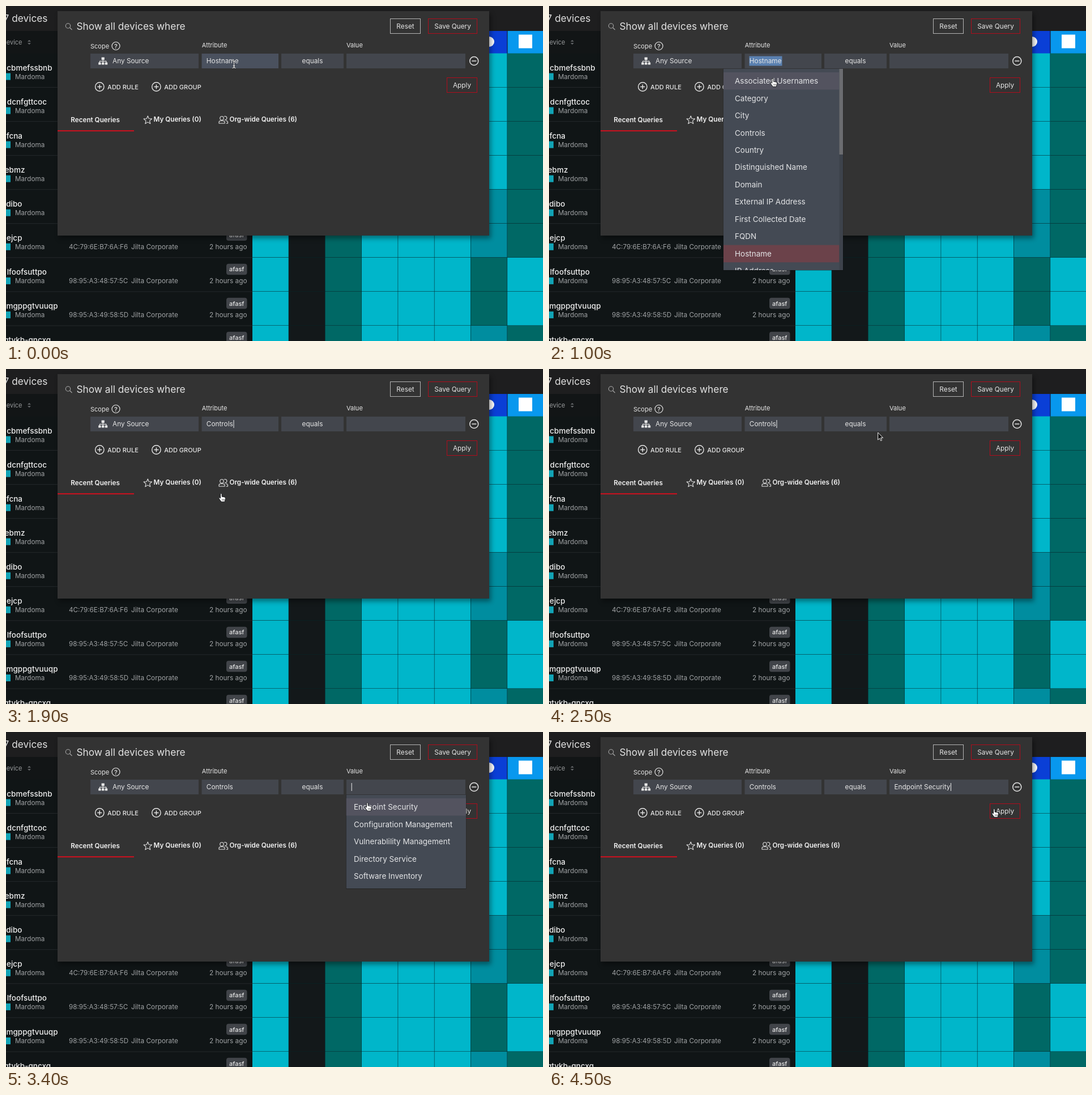
Write an HTML page that moves like this. It is 948x591 px and loops after 6500 ms.

```html
<!DOCTYPE html>
<html lang="en">
<head>
<meta charset="utf-8">
<title>Device query builder</title>
<style>
html, body { margin: 0; width: 100%; height: 100%; overflow: hidden; background: #101516; }
body > svg { display: block; width: 100vw; height: 100vh; }
text { font-family: Inter, Roboto, sans-serif; white-space: pre; }
#panel { filter: drop-shadow(3px 5px 4px rgba(0, 0, 0, .4)); }
</style>
</head>
<body>
<svg viewBox="0 0 948 591">
  <g id="table"></g>
  <g id="panel"><rect x="91" y="9" width="762" height="396" fill="#333"/></g>
  <g id="form"></g>
  <g id="live"></g>
</svg>
<script>
const $ = id => document.getElementById(id);
const rect = (x, y, w, h, fill, more = '') =>
  `<rect x="${x}" y="${y}" width="${w}" height="${h}" fill="${fill}" ${more}/>`;
const text = (x, y, str, size, fill = '#e6e6e6', more = '') =>
  `<text x="${x}" y="${y}" font-size="${size}" fill="${fill}" ${more}>${str}</text>`;
const icon = (x, y, d, width = 1.2, color = '#e6e6e6', fill = 'none') =>
  `<path transform="translate(${x} ${y})" d="${d}" fill="${fill}" stroke="${color}" stroke-width="${width}" stroke-linejoin="round"/>`;
const ring = r => `M${-r} 0a${r} ${r} 0 1 1 ${2 * r} 0a${r} ${r} 0 1 1 ${-2 * r} 0`;
const END = 'text-anchor="end"', MID = 'text-anchor="middle"';
const MEDIUM = ' font-weight="500"', BOLD = ' font-weight="600"';

// Device table behind the panel
const ROW = 60.06, COL = 64.3;
const hosts = [['cbmefssbnb', 81.5], ['dcnfgttcoc', 72], ['fcna', 29], ['ebmz', 33.5], ['dibo', 28.5],
  ['ejcp', 28.5], ['lfoofsuttpo', 72], ['mgppgtvuuqp', 91.5], ['qtvkb-qncxg', 79]];
const macs = { 5: '4C:79:6E:B7:6A:F6', 6: '98:95:A3:48:57:5C', 7: '98:95:A3:49:58:5D' };
const shades = { c: '#00b6ca', t: '#006865', m: '#008d9f', d: '#13181a' };
const ends = ['ct', 'ct', 'ct', 'ct', 'mt', 'mt', 'tc', 'tc', 'mt'];

function drawTable() {
  let s = rect(0, 0, 948, 44, '#1e1e1f') + rect(0, 44, 948, 40, '#121516')
    + text(73.5, 28, '7 devices', 17.3, '#e0e0e0', END)
    + text(28.5, 68, 'Device', 11, '#97999b', END)
    + icon(41, 64, 'M-3-1.2 0-4 3-1.2ZM-3 1.2 0 4 3 1.2Z', 0, 'none', '#6b6e70')
    + rect(820.5, 44, 64, 40, '#0a3fd6') + rect(885.5, 44, 63, 40, '#0898ee')
    + '<circle cx="853" cy="63" r="9" fill="#fff"/>' + rect(905, 50.5, 24, 24, '#fff');
  hosts.forEach(([host, right], i) => {
    const top = 83.5 + i * ROW;
    [...'cdtccc' + ends[i]].forEach((k, c) => {
      const x = 435 + c * COL;
      s += rect(x, top, COL, ROW, shades[k])
        + rect(x + COL - .6, top, 1, ROW, '#042b30');
    });
    s += rect(0, top + ROW - .5, 435, 1, '#24292b') + rect(435, top + ROW - .5, 513, 1, '#06262a')
      + text(right, top + 30.2, host, 13.5, '#eee', END + MEDIUM)
      + rect(-4, top + 35, 12, 12, '#12a3b5')
      + text(16, top + 45.4, 'Mardoma', 11.7, '#a0a3a5');
    if (i > 4) s += text(111, top + 45.4, macs[i] || '', 11.7, '#a0a3a5')
      + text(221, top + 45.4, 'Jilta Corporate', 11.8, '#a0a3a5')
      + text(425.5, top + 45.4, '2 hours ago', 11.8, '#a0a3a5', END)
      + rect(389, top + 10.8, 36.5, 19.5, '#414449', 'rx="4"')
      + text(407.2, top + 24.6, 'afasf', 11, '#e6e6e6', MID + MEDIUM);
  });
  return s;
}

// Parts of the query form that never change
const button = (x, y, w, label, color) =>
  rect(x + .5, y + .5, w, 26, 'none', `stroke="${color}"`) + text(x + w / 2 + .5, y + 17.7, label, 11.8, '#e6e6e6', MID);
const plus = (x, label) =>
  icon(x, 142.5, ring(7.7) + 'M-4 0H4M0-4V4', 1.4) + text(x + 13.8, 146.7, label, 11, '#e6e6e6', MEDIUM);

function drawForm() {
  const star = Array.from({ length: 10 }, (_, i) => {
    const a = i * Math.PI / 5, r = i % 2 ? 3.4 : 7.6;
    return `${i ? 'L' : 'M'}${(r * Math.sin(a)).toFixed(2)} ${(-r * Math.cos(a)).toFixed(2)}`;
  }).join('') + 'Z';
  const red = '#b00c1c';
  return icon(109.5, 35, ring(4.2) + 'M3 3 7 7', 1.1, '#a8a8a8')
    + text(124.5, 41.8, 'Show all devices where', 17.3, '#e2e2e2')
    + button(678, 22, 53, 'Reset', '#b4b4b4') + button(745, 22, 86, 'Save Query', red)
    + button(778, 126, 53, 'Apply', red)
    + text(149, 74.8, 'Scope', 11) + text(345.8, 72.8, 'Attribute', 11) + text(601, 72.8, 'Value', 11)
    + icon(194, 70.5, ring(7)) + text(194, 74.6, '?', 11, '#e6e6e6', MID + MEDIUM)
    + rect(149, 84, 191, 26, '#43464d') + text(188, 101.3, 'Any Source', 11.8)
    + icon(171.2, 97, 'M-2.6-6.5H2.6V-2H-2.6ZM-8 2.5H-3.5V6.5H-8ZM-2.2 2.5H2.2V6.5H-2.2ZM3.5 2.5H8V6.5H3.5Z', 0, 'none', '#e6e6e6')
    + icon(171.2, 97, 'M0-2V3M-5.8 3V.3H5.8V3')
    + rect(486, 84, 110, 26, '#43464d') + text(541, 101.3, 'equals', 11.8, '#e6e6e6', MID)
    + icon(826.3, 97, ring(7.5) + 'M-4 0H4', 1.5)
    + plus(165.3, 'ADD RULE') + plus(265.4, 'ADD GROUP')
    + text(114.3, 205.2, 'Recent Queries', 11.7, '#f2f2f2', BOLD) + rect(91, 219.2, 135, 2, '#d00f1e')
    + icon(250.3, 201.5, star, 1.1) + text(260.5, 203.8, 'My Queries (0)', 11.7, '#f2f2f2', BOLD)
    + icon(381, 198, ring(3.2) + 'M-5 9V7Q-5 4.5-2 4.5H2Q5 4.5 5 7V9ZM4-3a3.2 3.2 0 1 1 1 5.8M7 4.5Q10.5 4.5 10.5 7V9H7.5', 1.1)
    + text(394.5, 203.8, 'Org-wide Queries (6)', 11.7, '#f2f2f2', BOLD);
}

// Drop-down lists
const ITEM = 30.47, LIST_TOP = 117;
const attributes = ['Associated Usernames', 'Category', 'City', 'Controls', 'Country', 'Distinguished Name',
  'Domain', 'External IP Address', 'First Collected Date', 'FQDN', 'Hostname', 'IP Address'];
const values = ['Endpoint Security', 'Configuration Management', 'Vulnerablility Management',
  'Directory Service', 'Software Inventory'];

function menu(x, width, height, pad, items, pointerY, barWidth = 0, chosen = -1) {
  const top = 110.5, over = Math.floor((pointerY - LIST_TOP) / ITEM);
  let s = rect(x, top, width, height, '#444a54');
  items.forEach((item, i) => {
    const y = LIST_TOP + i * ITEM;
    const fill = i === over ? '#53535f' : i === chosen ? '#6b424a' : '';
    if (fill) s += rect(x, y, width - barWidth, ITEM, fill);
    s += text(x + pad, y + 20.1, item, 13.5, '#e4e5e7');
  });
  if (barWidth) s += rect(x + width - barWidth, top, barWidth, height, '#3d424b')
    + rect(x + width - barWidth, 111, barWidth, 151, '#6b6c70');
  // A nested viewport cuts off the last item
  return rect(x - .5, top, width + 1, height + 1, '#0004')
    + `<svg x="${x}" y="${top}" width="${width}" height="${height}" viewBox="${x} ${top} ${width} ${height}" overflow="hidden">${s}</svg>`;
}

// Pointer path: time, x, y
const stops = [[0, 402.5, 103], [800, 402.5, 103], [1400, 382, 227], [1900, 382, 227], [2700, 621, 99],
  [3000, 621, 99], [3400, 640, 132], [3900, 640, 132], [4500, 788, 143], [6500, 788, 143]];
const ticks = [0, 500, 1000, 1200, 1400, 1900, 2100, 2300, 2500, 2700, 3200, 3400, 3900, 4100, 4300, 4500];

function pointerAt(t) {
  const i = stops.findIndex(s => s[0] > t);
  const [t0, x0, y0] = stops[i - 1], [t1, x1, y1] = stops[i];
  const k = (t - t0) / (t1 - t0), e = k * k * (3 - 2 * k);
  return [x0 + (x1 - x0) * e, y0 + (y1 - y0) * e];
}

function pointer(x, y, kind) {
  if (kind === 'beam') {
    const d = 'M-3-6.5Q0-6.5 0-4Q0-6.5 3-6.5M0-4V4M-3 6.5Q0 6.5 0 4Q0 6.5 3 6.5M-1.8 2.5H1.8';
    return icon(x, y, d, 2.6, '#2a2d33') + icon(x, y, d, 1.2, '#f4f4f4');
  }
  if (kind === 'hand') {
    const d = 'M-3.5 1V-6q0-1.4 1.3-1.4T-.9-6v4l4.6.9q2 .5 1.8 2.4L4.9 4.2 4.2 7.2H-2L-5.8 2q-1-1.4 0-2t2.3 1Z';
    return icon(x, y, d, 1, '#16181b', '#fff') + icon(x, y, 'M-.4 2.4V5M1.4 2.4V5M3.1 2.4V5', .7, '#333');
  }
  return icon(x - 3, y - 7, 'M0 0V13L3 10.2 5 14.6 7 13.7 5.1 9.4H9Z', 1, '#f4f4f4', '#111');
}

function drawLive(t) {
  const [x, y] = pointerAt(t);
  const listA = t >= 500 && t < 1900, listV = t >= 2700 && t < 3900;
  const inField = y > 84 && y < 110;
  const travelling = t > 1900 && t < 2700 || t > 3900 && t < 4500;
  const kind = inField ? 'beam' : travelling ? 'arrow' : 'hand';
  const field = (fx, w) => rect(fx, 84, w, 26, inField && x > fx && x < fx + w ? '#4a515e' : '#43464d');
  const caret = cx => rect(cx, 90, 1, 14, '#f0f0f0');

  let s = field(345.5, 135.5) + field(601, 210);
  if (listA) s += rect(353.5, 88.5, 58, 17, '#5a80b0');
  s += text(353.8, 101.3, t < 1900 ? 'Hostname' : 'Controls', 11.8);
  if (t >= 1900 && t < 2700) s += caret(401.5);
  if (listV) s += caret(609.7);
  if (t >= 3900) s += text(609.5, 101.3, 'Endpoint Security', 11.8) + caret(709);
  if (listA) s += menu(308, 211, 355.5, 20, attributes, y, 6.5, 10);
  if (listV) s += menu(600.5, 211.5, 165.5, 13.5, values, y);
  return s + pointer(x, y, kind);
}

$('table').innerHTML = drawTable();
$('form').innerHTML = drawForm();
const start = performance.now();
let shown = -1;
function play() {
  const t = (performance.now() - start) % 6500;
  const held = ticks.filter(k => k <= t).pop();
  if (held !== shown) $('live').innerHTML = drawLive(shown = held);
  requestAnimationFrame(play);
}
play();
</script>
</body>
</html>
```
